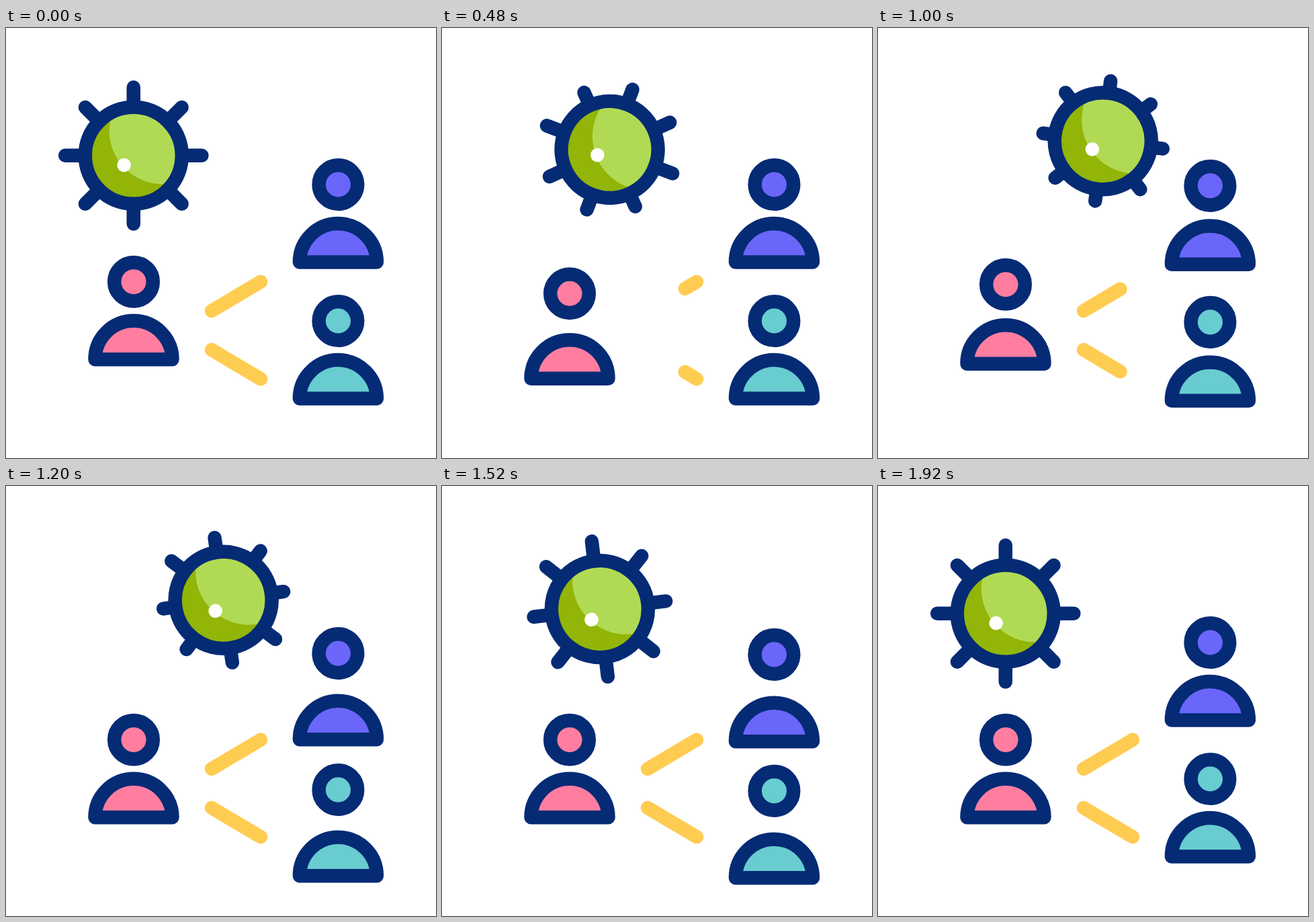
An HTML page that plays this animation: 640x640 px, repeating every 1960 ms.

```html
<!DOCTYPE html>
<html lang="en">
<head>
<meta charset="utf-8">
<title>Virus spread</title>
<style>
  html, body { margin: 0; width: 100%; height: 100%; overflow: hidden; background: #fff; }
  svg { display: block; width: 100vw; height: 100vh; }
  .ink { stroke: #052b75; stroke-width: 20.5; stroke-linecap: round; stroke-linejoin: round; }
  .ray { stroke: #ffcc52; stroke-width: 20.5; stroke-linecap: round; }
</style>
</head>
<body>
<svg id="stage" viewBox="0 0 640 640">
  <defs><clipPath id="ball"><circle r="70"/></clipPath></defs>
</svg>
<script>
const LOOP = 1960, STEP = 40;
const stage = document.getElementById('stage');

function add(parent, tag, attrs) {
  const el = document.createElementNS('http://www.w3.org/2000/svg', tag);
  set(el, attrs);
  return parent.appendChild(el);
}

function set(el, attrs) {
  for (const key in attrs) el.setAttribute(key, attrs[key]);
}

// Symmetric cubic bezier (p, 0, 1 - p, 1)
function ease(u, p = 0.5) {
  if (u <= 0) return 0;
  if (u >= 1) return 1;
  let lo = 0, hi = 1, s;
  for (let i = 0; i < 24; i++) {
    s = (lo + hi) / 2;
    const x = 3 * p * s * (1 - s) ** 2 + 3 * (1 - p) * s * s * (1 - s) + s ** 3;
    if (x < u) lo = s; else hi = s;
  }
  return s * s * (3 - 2 * s);
}

const ramp = (t, from, to, p) => ease((t - from) / (to - from), p);
const pulse = (t, a, b, c, d, p) => ramp(t, a, b, p) - ramp(t, c, d, p);

// Virus
const virus = add(stage, 'g', {});
const spikes = Array.from({ length: 8 }, (_, i) =>
  add(virus, 'line', { class: 'ink', y1: -72, transform: `rotate(${i * 45})` }));
add(virus, 'circle', { r: 72, fill: '#92b507' });
add(virus, 'circle', { cx: 43.5, cy: -37, r: 79.5, fill: '#b1da54', 'clip-path': 'url(#ball)' });
add(virus, 'circle', { r: 72, fill: 'none', class: 'ink' });
add(virus, 'circle', { cx: -14.2, cy: 14.2, r: 10.3, fill: '#fff' });

function drawVirus(t) {
  const move = pulse(t, 43, 993, 995, 1885, 0.55);
  const turn = 26 * ramp(t, 105, 665) - 36 * ramp(t, 668, 1320) + 10 * ramp(t, 1320, 1810);
  const x = 189.8 + 145 * move, y = 189.8 - 21.6 * move;
  virus.setAttribute('transform', `translate(${x} ${y}) rotate(${turn})`);
  spikes.forEach((spike, i) => {
    const k = (i + 1) % 4;
    const out = 70 + 78 * k, back = 840 + 82 * k;
    spike.setAttribute('y2', -101.6 + 11.8 * pulse(t, out, out + 660, back, back + 660));
  });
}

// People
function person(x, y, fill, headDrop, times) {
  const body = add(stage, 'path', { class: 'ink', fill, d: 'M-57.5 0A57.5 57.5 0 0 1 57.5 0Z' });
  const head = add(stage, 'circle', { class: 'ink', fill, r: 28.8 });
  return t => {
    const drop = pulse(t, ...times);
    body.setAttribute('transform', `translate(${x} ${y + 37.2 * drop})`);
    set(head, { cx: x, cy: y - 115.6 + headDrop * drop });
  };
}

const late = [890, 1368, 1372, 1880];
const people = [
  person(190, 493.3, '#ff7ea0', 23, [171, 651, 669, 1149]),
  person(494.4, 348.6, '#6b66fa', 21, late),
  person(494.4, 551.6, '#68ccd0', 21, late)
];

// Rays leave from the near end and grow back towards the far end
function ray(y1, y2) {
  const x1 = 306, x2 = 379;
  const el = add(stage, 'line', { class: 'ray' });
  const at = u => [x1 + (x2 - x1) * u, y1 + (y2 - y1) * u];
  return t => {
    const grows = t > 670;
    const [ax, ay] = at(grows ? 0 : ramp(t, 171, 651));
    const [bx, by] = at(grows ? ramp(t, 680, 1185) : 1);
    set(el, {
      x1: ax, y1: ay, x2: bx, y2: by,
      visibility: bx - ax < 0.05 ? 'hidden' : 'visible'
    });
  };
}

const rays = [ray(421, 377.7), ray(479, 522.3)];

function draw(t) {
  drawVirus(t);
  people.forEach(f => f(t));
  rays.forEach(f => f(t));
}

const start = performance.now();
function tick() {
  const t = (performance.now() - start) % LOOP;
  draw(Math.floor(t / STEP) * STEP);
  requestAnimationFrame(tick);
}
tick();
</script>
</body>
</html>
```
